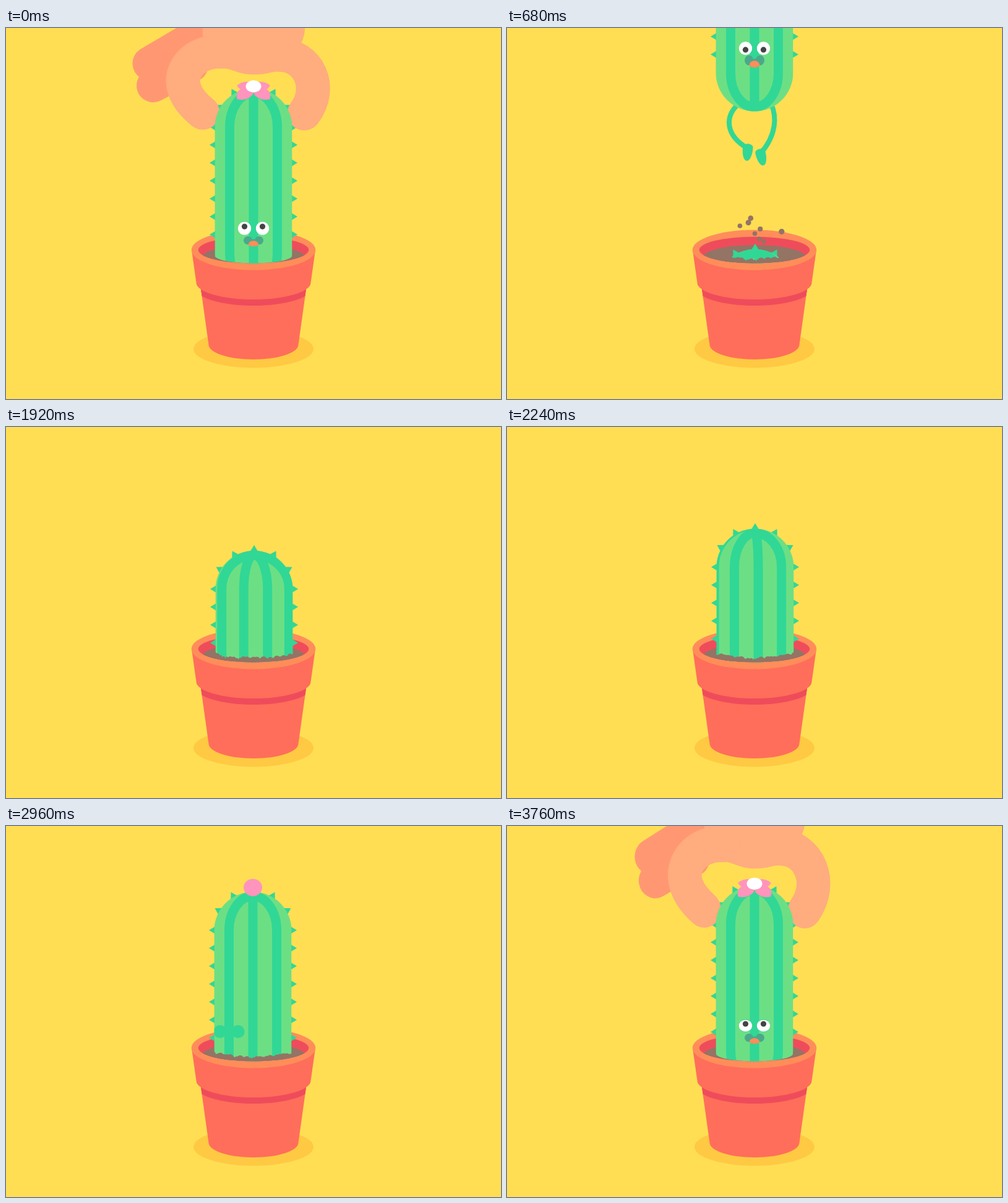
Recreate the animation shown at these times as an HTML page with a canvas. Size 800 by 600 pixels, loop 3.8 s.

```html
<!DOCTYPE html>
<html>
<head>
<meta charset="utf-8">
<style>
html, body { margin: 0; width: 100%; height: 100%; overflow: hidden; background: #ffde54; }
canvas { display: block; }
</style>
</head>
<body>
<canvas id="stage" width="800" height="600"></canvas>
<script>
const ctx = document.getElementById('stage').getContext('2d');
const LOOP = 3800, TAU = Math.PI * 2;
const C = {
  bg: '#ffde54', shadow: '#ffc943', pot: '#ff6e5a', rim: '#ff8d5a', inner: '#ef4c5b',
  soil: '#937465', light: '#6cdf85', dark: '#31d795', pink: '#ff94bc', hand: '#ffac7e',
  thumb: '#ff9872', mouth: '#4aa98a', pupil: '#444444'
};
const RADIUS = 62.5, HEIGHT = 328;

// Timing helpers: linear progress, smooth step, and a rise and fall.
const progress = (t, a, b) => Math.min(1, Math.max(0, (t - a) / (b - a)));
const ease = (t, a, b) => { const s = progress(t, a, b); return s * s * (3 - 2 * s); };
const bump = (t, a, b) => Math.sin(Math.PI * progress(t, a, b));

const lift = t => 0.00116 * Math.max(0, t - 180) ** 2 - 6 * bump(t, 0, 320);
const potLift = t => 18 * bump(t, 200, 540);
// Steady growth that slows down to a stop.
const growTop = t => 97 + 0.1447 * (Math.hypot(Math.max(0, 3340 - t), 1060) - 1060);
const sway = t => 401 - 2 * ease(t, 2560, 2960) + ease(t, 2960, 3280);
// Turn of the stem, in ribs; the face looks ahead at zero.
const turn = t => Math.min(-1, -3.57 + (t - 1280) * 0.00177) + ease(t, 2960, 3320);
const looseSoil = t => ease(t, 540, 620) - ease(t, 3000, 3320);
const rand = i => { const s = Math.sin(i * 12.9898) * 43758.5453; return s - Math.floor(s); };

function scoped(draw) {
  ctx.save();
  draw();
  ctx.restore();
}
function ellipse(x, y, rx, ry, color) {
  ctx.beginPath();
  ctx.ellipse(x, y, rx, ry, 0, 0, TAU);
  ctx.fillStyle = color;
  ctx.fill();
}
function clipEllipse(x, y, rx, ry) {
  ctx.beginPath();
  ctx.ellipse(x, y, rx, ry, 0, 0, TAU);
  ctx.clip();
}
function fillPath(d, color) {
  ctx.fillStyle = color;
  ctx.fill(new Path2D(d));
}
function strokePath(d, color, width) {
  ctx.strokeStyle = color;
  ctx.lineWidth = width;
  ctx.lineCap = 'round';
  ctx.stroke(new Path2D(d));
}

function drawPot(dy) {
  const k = 1 + dy * 0.006;
  ellipse(400, 519, 97 * k, 30.5 * k, C.shadow);
  scoped(() => {
    ctx.translate(0, dy);
    const base = 'M313.5 412L327.5 512A72.5 24 0 0 0 472.5 512L486.5 412Z';
    const lip = 'M300 359L307.5 412A92.5 27 0 0 0 492.5 412L500 359Z';
    fillPath(base, C.pot);
    scoped(() => {
      ctx.clip(new Path2D(base));
      ctx.translate(0, 10);
      fillPath(lip, C.inner);
    });
    fillPath(lip, C.pot);
    ellipse(400, 359, 100.3, 32.5, C.rim);
    ellipse(400, 359, 89.3, 21.5, C.inner);
    clipEllipse(400, 359, 89.3, 21.5);
    ellipse(400, 371.5, 84, 20.5, C.soil);
  });
}

function drawSpikes(cx, top, tip, limit) {
  const spike = (x, y, angle, length) => scoped(() => {
    ctx.translate(x, y);
    ctx.rotate(angle);
    ctx.beginPath();
    ctx.moveTo(length, 0);
    ctx.lineTo(-1, 6);
    ctx.lineTo(-1, -6);
    ctx.fill();
  });
  scoped(() => {
    ctx.beginPath();
    ctx.rect(0, -900, 800, 900 + limit);
    ctx.clip();
    ctx.fillStyle = C.dark;
    for (let i = 1; i < 6; i++) {
      const a = Math.PI + i * Math.PI / 6;
      spike(cx + 62 * Math.cos(a), top + 62 + 62 * Math.sin(a), a, i === 3 ? 9 * tip : 9);
    }
    for (let i = 0; i < 7; i++) {
      const y = top + 62 + 29 * i;
      spike(cx - 62, y, Math.PI, 9);
      spike(cx + 62, y, 0, 9);
    }
  });
}

// Horizontal place of a rib or the face, compressed toward the sides.
function around(u) {
  const a = Math.abs(u);
  return Math.sign(u) * (38.5 * a - 7 * Math.max(0, a - 1));
}

function drawBody(cx, top, u) {
  scoped(() => {
    ctx.beginPath();
    ctx.roundRect(cx - RADIUS, top, 2 * RADIUS, HEIGHT, RADIUS);
    ctx.fillStyle = C.light;
    ctx.fill();
    ctx.clip();
    ctx.strokeStyle = C.dark;
    ctx.lineWidth = 15;
    for (let i = -2; i < 2; i++) {
      const dx = around(u - Math.floor(u) + i), r = Math.abs(dx), left = dx < 0;
      const ry = 55 + 1.6 * Math.max(0, r - 58), side = left ? Math.PI : 0;
      ctx.beginPath();
      ctx.ellipse(cx, top + 62, r, ry, 0, -Math.PI / 2, -side, left);
      ctx.ellipse(cx, top + HEIGHT - 62, r, ry, 0, side, Math.PI / 2, left);
      ctx.stroke();
    }
  });
}

function drawFace(x, y, face) {
  for (const ex of [x - 14.5, x + 14.5]) {
    ellipse(ex, y, 10.6 * face.size, 10.6 * face.size, C.dark);
    scoped(() => {
      clipEllipse(ex, y, 10.8, 10.8 * face.open);
      ellipse(ex, y, 10.8, 10.8, '#fff');
      ellipse(ex, y + face.gaze, 4.6, 4.6, C.pupil);
    });
  }
  scoped(() => {
    ctx.translate(x, y + 20);
    ctx.scale(face.mouth, face.mouth * face.gasp);
    ellipse(-9, -0.5, 7, 6.8, C.mouth);
    ellipse(9, -0.5, 7, 6.8, C.mouth);
    ellipse(0, 3, 10, 5.5, C.mouth);
    fillPath('M-8.5 7A8.5 7 0 0 1 8.5 7Q0 11.5 -8.5 7Z', C.rim);
  });
}

function drawFlower(cx, top, bud, bloom) {
  ctx.fillStyle = C.dark;
  ctx.fillRect(cx - 5, top - 6 * bud, 10, 8 * bud);
  ellipse(cx, top - 7 * bud, 15 * bud, 14 * bud * bud, C.pink);
  scoped(() => {
    ctx.translate(cx, top - 4);
    ctx.scale(bloom, bloom);
    for (const side of [1, -1]) scoped(() => {
      ctx.scale(side, 1);
      fillPath('M-27 -1Q-14 -11 0 -5V8Q-20 11 -27 -1Z', C.pink);
      fillPath('M-27 21Q-29 4 -15 4L0 9Q0 14 -6 18Q-14 24 -27 21Z', C.pink);
    });
    ellipse(0, 0.3, 12.5, 9.8, '#fff');
  });
}

function drawLegs(t, cx, bottom) {
  const kick = 8 * Math.sin((t - 680) / 240 * TAU);
  const leg = (hip, knee, foot, y, tilt) => scoped(() => {
    ctx.translate(cx, bottom);
    strokePath(`M${hip} -12C${knee} 8 ${knee} 38 ${foot} ${y}`, C.dark, 8);
    ctx.translate(foot, y);
    ctx.rotate(tilt);
    fillPath('M-8 -3C-7 -9 7 -9 8 -3C9 6 6 20 0 20C-6 20 -9 6 -8 -3Z', C.dark);
  });
  leg(-26, -48, -11 + kick, 60, 0.1);
  leg(27, 36, 10 - kick, 68, -0.24);
}

function drawHand({ dy, squash, spread }) {
  scoped(() => {
    ctx.translate(400, 165 + dy);
    ctx.scale(1 + 0.01 * squash, 1 - 0.07 * squash);
    ctx.translate(-400, -165);
    const l = -spread, r = spread, thumb = -0.4 * spread;
    strokePath(`M${232 + thumb} 57L300 17L360 -60`, C.thumb, 55);
    strokePath(`M${238 + thumb} 93L300 60`, C.thumb, 54);
    fillPath('M318 -260V12L340 64C365 63 372 75 400 75C425 75 425 70 445 70L477 24Q483 12 483 0V-260Z', C.hand);
    strokePath(`M350 38C${300 + l} 34 ${253 + l} 85 ${318 + l} 137`, C.hand, 55);
    strokePath(`M443 43C${488 + r} 44 ${514 + r} 95 ${482 + r} 138`, C.hand, 55);
  });
}

function drawLooseSoil(t) {
  const amount = looseSoil(t);
  scoped(() => {
    ctx.beginPath();
    ctx.rect(310, 330, 180, 29);
    ctx.ellipse(400, 359, 89.3, 21.5, 0, 0, TAU);
    ctx.clip();
    for (let i = 0; i < 27; i++) {
      const dx = -70 + i * 140 / 26, y = 361 + 16 * Math.sqrt(1 - (dx / 74) ** 2);
      const r = 4 + 1.7 * Math.sin(rand(i) * TAU + t / 130);
      ellipse(400 + dx, y, r * amount, r * amount, C.soil);
      ellipse(400 + dx, y + 4, 4 * amount, 4 * amount, C.soil);
    }
  });
}

function drawGrains(t) {
  const age = t - 480;
  if (age < 0) return;
  for (let i = 0; i < 8; i++) {
    const x = 366 + 76 * rand(i + 3), rise = 0.12 + 0.16 * rand(i + 40);
    const y = 362 - rise * age * 1.6 + 0.0008 * age * age;
    if (y < 368) ellipse(x + (x - 400) * age * 0.0005, y, 3.5 + 1.6 * rand(i + 70), 3.5 + 1.6 * rand(i + 70), C.soil);
  }
}

function drawCactus(t, cactus) {
  const { cx, top, u, potY, hand, face, legs } = cactus;
  drawSpikes(cx, top, cactus.tip, (top > 300 ? 374 : 359) + potY);
  if (hand) drawHand(hand);
  scoped(() => {
    // Only what rises above the soil line is visible.
    ctx.beginPath();
    ctx.rect(cx - RADIUS, -900, 2 * RADIUS, 1268 + potY);
    ctx.ellipse(cx, 368 + potY, RADIUS, 12.5, 0, 0, Math.PI);
    ctx.clip();
    if (legs) drawLegs(t, cx, top + HEIGHT);
    drawBody(cx, top, u);
    if (Math.abs(u) < 1.6) drawFace(cx + around(u), top + 226, face);
  });
  drawFlower(cx, top, cactus.bud, cactus.bloom);
}

function growing(t) {
  const bloom = ease(t, 3040, 3320);
  return {
    cx: sway(t), top: growTop(t), u: turn(t), potY: 0, legs: false,
    tip: 1 - ease(t, 2300, 2480), bud: ease(t, 2300, 2760) * (1 - 0.3 * bloom), bloom,
    face: {
      size: ease(t, 2760, 2900), open: progress(t, 3500, 3800), gaze: -3,
      mouth: ease(t, 3400, 3600), gasp: 1
    },
    hand: t > 3240 && {
      dy: -230 * (1 - ease(t, 3240, 3620)),
      squash: -2.3 * bump(t, 3520, 3800),
      spread: 41 * bump(t, 3360, 3680)
    }
  };
}

function leaving(t) {
  return {
    cx: 400, top: 98 - lift(t), u: 0, potY: -potLift(t), legs: true, tip: 0, bud: 0, bloom: 1,
    face: { size: 1, open: 1, gaze: -3 + 5.3 * ease(t, 300, 440), mouth: 1, gasp: 1 + 0.2 * ease(t, 260, 440) },
    hand: t < 600 && {
      dy: -lift(t),
      squash: 2.6 * bump(t, 0, 260) - 1.2 * ease(t, 200, 400),
      spread: 0
    }
  };
}

function render(t) {
  ctx.fillStyle = C.bg;
  ctx.fillRect(0, 0, 800, 600);
  drawPot(-potLift(t));
  if (t >= 540) {
    drawCactus(t, growing(t));
    drawLooseSoil(t);
  }
  drawGrains(t);
  if (t < 1000) drawCactus(t, leaving(t));
}

function loop() {
  render(performance.now() % LOOP);
  requestAnimationFrame(loop);
}
loop();
</script>
</body>
</html>
```
